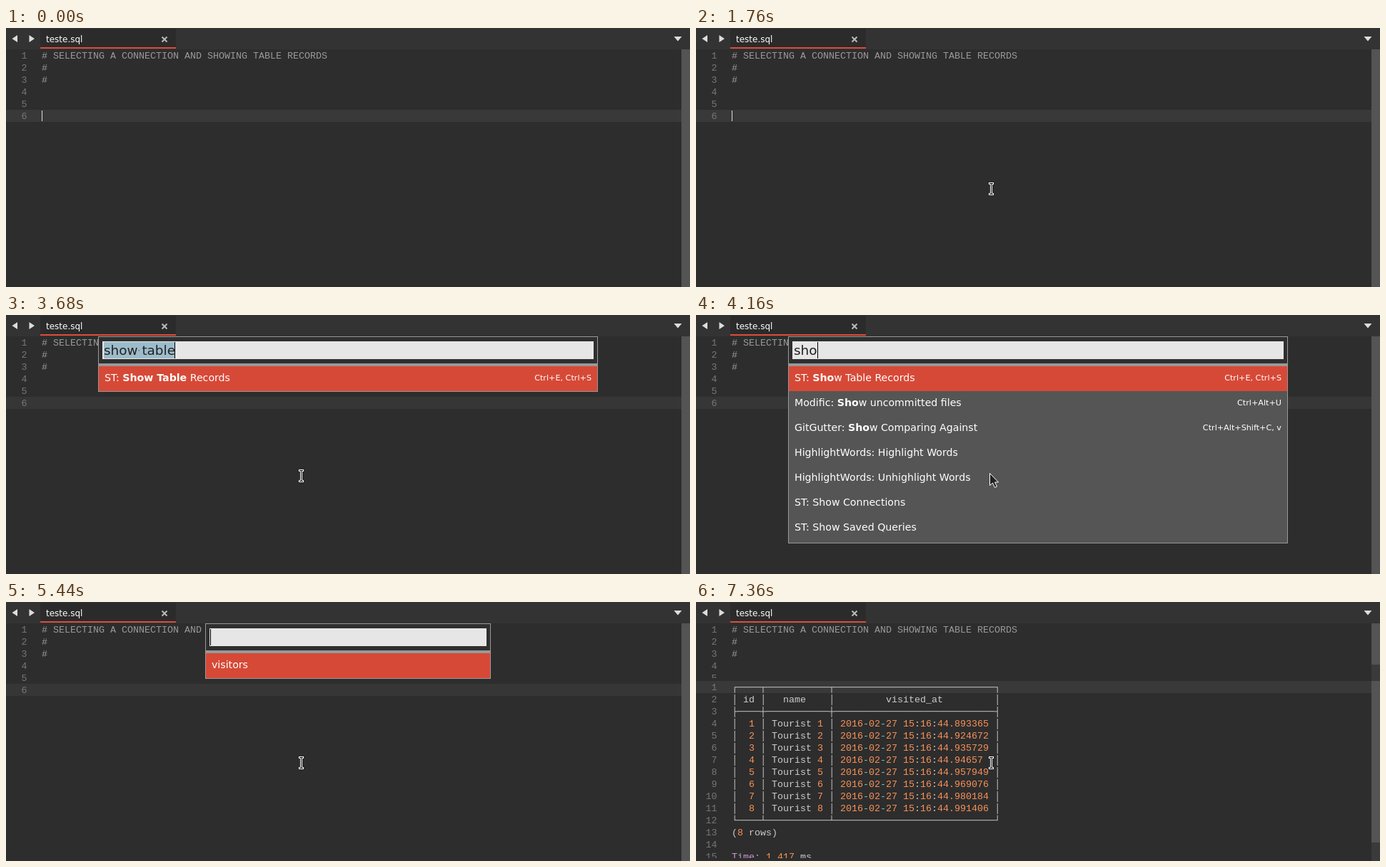
Write an HTML page that moves like this. It is 958 by 364 pixels and loops after 8000 ms.

```html
<!DOCTYPE html>
<html lang="en">
<head>
<meta charset="utf-8">
<title>SQL editor</title>
<style>
  html, body { margin: 0; width: 100%; height: 100%; overflow: hidden; background: #2d2d2d; }
  svg { display: block; }
  text { white-space: pre; font-family: "DejaVu Sans", sans-serif; }
  .code { font: 13.333px "Liberation Mono", monospace; }
</style>
</head>
<body>
<svg id="stage" width="958" height="364" viewBox="0 0 958 364"></svg>
<script>
const LOOP = 8000;
const RED = '#d64937', FG = '#ccc', DIM = '#777';

const rect = (x, y, w, h, fill) =>
  `<rect x="${x}" y="${y}" width="${w}" height="${h}" fill="${fill}"/>`;
const text = (x, y, s, size, fill = '#fff', anchor = 'start') =>
  `<text x="${x}" y="${y}" font-size="${size}" fill="${fill}" text-anchor="${anchor}">${s}</text>`;
const code = (x, y, s, fill, anchor = 'start') =>
  `<text class="code" x="${x}" y="${y}" fill="${fill}" text-anchor="${anchor}">${s}</text>`;
const path = (d, attrs) => `<path d="${d}" ${attrs}/>`;
const tint = (s, fill) => `<tspan fill="${fill}">${s}</tspan>`;
const bold = s => s.replace(/\*(.+?)\*/g, '<tspan font-weight="bold">$1</tspan>');

// Value of the last [start, value] step reached at time t
const at = (t, steps) => steps.reduce((v, [start, next]) => t >= start ? next : v, null);

const topBar =
  rect(0, 0, 958, 30, '#333') + rect(48, 1, 190, 28, '#2b2b2b') + rect(48, 27, 190, 2, '#dd4b39') +
  path('M16 10V20L8.5 15ZM32.5 10V20L40 15ZM935.5 12H946.5L941 18.5Z', 'fill="#ddd"') +
  path('M218.5 12.5L225.5 19.5M225.5 12.5L218.5 19.5', 'stroke="#bbb" stroke-width="2"') +
  text(56, 20, 'teste.sql', 12);

function editor(focused) {
  let s = rect(0, 115, 946, 17, focused ? '#393939' : '#363636') + rect(946, 30, 12, 334, '#545454');
  for (let n = 1; n <= 6; n++) s += code(29.5, 26 + 17 * n, n, DIM, 'end');
  ['# SELECTING A CONNECTION AND SHOWING TABLE RECORDS', '#', '#']
    .forEach((line, i) => s += code(50, 43 + 17 * i, line, '#999'));
  return s;
}

// Framed list with an input line; each row is "label|right side" or "label|right|detail"
function popup(x, w, bottom, input, caretX, rows, selected, pitch, marked) {
  let s = rect(x, 30, w, bottom - 30, '#999') + rect(x + 1, 31, w - 2, 37, '#2f2f2f') +
    rect(x + 6, 37, w - 12, 25, '#e6e6e6') + rect(x + 1, 72, w - 2, bottom - 73, '#555');
  if (marked) s += rect(x + 8, 38, 100, 23, '#9dbccb') + rect(x + 56.5, 49, 1.5, 1.5, '#667');
  s += text(x + 8, 56, input, 18.4, '#222');
  if (caretX) s += rect(caretX, 38, 1, 23, '#000');
  rows.forEach((row, i) => {
    const [label, right = '', detail = ''] = row.split('|'), y = 72 + pitch * i;
    if (i === selected) s += rect(x + 1, y, w - 2, pitch, RED);
    s += text(x + 9, y + 21, bold(label), 14.15) +
      text(x + w - 9, y + 20, right, 11.2, '#fff', 'end') + text(x + 13, y + 42, detail, 11.2);
  });
  return s;
}

const connections = ['lmonteiro', 'lmontero', 'lmontero'].map((user, i) =>
  `Connection ${i + 1}||DB: connection, Connection: ${user}@localhost:5432`);

const showRows = [
  'Modific: *Show* uncommitted files|Ctrl+Alt+U',
  'ST: *Show* Table Records|Ctrl+E, Ctrl+S',
  'GitGutter: *Show* Comparing Against|Ctrl+Alt+Shift+C, v',
  'HighlightWords: Highlight Words',
  'HighlightWords: Unhighlight Words'
];
const sRows = [
  '*S*T: Show Table Records|Ctrl+E, Ctrl+S',
  '*S*T: Select Connection|',
  '*S*T: Describe Table|',
  'Modific: *S*how uncommitted files|Ctrl+Alt+U',
  'GitGutter: *S*how Comparing Against|Ctrl+Alt+Shift+C, v',
  'HighlightWords: Highlight Word*s*',
  'HighlightWords: Unhighlight Word*s*'
];
const shoRows = [
  'ST: *Sho*w Table Records|Ctrl+E, Ctrl+S',
  'Modific: *Sho*w uncommitted files|Ctrl+Alt+U',
  'GitGutter: *Sho*w Comparing Against|Ctrl+Alt+Shift+C, v',
  'HighlightWords: Highlight Words',
  'HighlightWords: Unhighlight Words',
  'ST: Show Connections',
  'ST: Show Saved Queries'
];

const palette = (input, caretX, rows, selected = 0, bottom = 108, marked = false) =>
  popup(129, 700, bottom, input, caretX, rows, selected, 35, marked);
const found = label => [`ST: ${label} Records|Ctrl+E, Ctrl+S`];
const tables = caret => popup(279, 400, 108, '', caret && 286, ['visitors'], 0, 35);

const popups = [
  [0, ''],
  [1280, popup(279, 400, 250, '', 286, connections, 0, 59)],
  [1760, ''],
  [3680, palette('show table', 236, found('*Show Table*'), 0, 108, true)],
  [4000, palette('s', 147, sRows, 0, 321)],
  [4160, palette('sho', 170, shoRows, 0, 321)],
  [4320, palette('show', 184, showRows, 1, 248)],
  [4640, palette('show ', 190, showRows, 1, 248)],
  [4800, palette('show tab', 220, found('*Show Tab*le'))],
  [5120, palette('show table', 236, found('*Show Table*'))],
  [5440, tables(true)],
  [6240, tables(false)],
  [6720, tables(true)],
  [7200, '']
];

function results() {
  const rule = ends => ends[0] + [4, 11, 28].map(n => '─'.repeat(n)).join(ends[1]) + ends[2];
  const micros = ['893365', '924672', '935729', '94657 ', '957949', '969076', '980184', '991406'];
  const paint = s => s.replace(/[\d.]+|-/g, m => tint(m, m === '-' ? '#6cc' : '#f99157'));
  const lines = [
    rule('┌┬┐'),
    '│ id │   name    │         visited_at         │',
    rule('├┼┤'),
    ...micros.map((m, i) => `│  ${i + 1} │ Tourist ${i + 1} │ 2016-02-27 15:16:44.${m} │`),
    rule('└┴┘'),
    '(8 rows)',
    '',
    'Time: 1.417 ms'
  ];
  let s = rect(0, 107, 958, 257, '#2d2d2d') + rect(0, 111, 946, 17, '#393939') +
    rect(946, 88, 12, 276, '#3a3a3a') + rect(946, 111, 12, 227, '#545454');
  lines.forEach((line, i) => {
    const y = 124 + 17 * i;
    s += code(29.5, y, i + 1, DIM, 'end') +
      code(50, y, paint(line).replace('Time:', tint('Time:', '#c9c')), FG);
  });
  return s + rect(0, 360, 946, 4, '#2d2d2d');
}
const panel = results();

const beamPath = 'M-2 -7.5H2M0 -7.5V7.5M-2 7.5H2';
const beam = (x, y) => `<g transform="translate(${x} ${y})" stroke-linecap="square">` +
  path(beamPath, 'stroke="#fff" stroke-width="3"') +
  path(beamPath, 'stroke="#111" stroke-width="1"') + '</g>';
const arrow = path('M411.5 222.5v17l4 -3.5l3 6.5l3 -1.5l-3 -6h5Z', 'fill="#222" stroke="#fff"');
const restBeam = beam(413.5, 226);
const pointers = [
  [0, ''], [160, beam(420.5, 235.5)], [320, restBeam], [1280, arrow],
  [1760, restBeam], [4000, arrow], [4640, restBeam]
];
const carets = [
  [0, true], [1120, false], [1760, true], [2560, false],
  [3040, true], [3680, false], [7200, true], [7360, false]
];

const stage = document.getElementById('stage');
let shown = '';
function draw(now) {
  const t = now % LOOP, open = at(t, popups);
  const picture = rect(0, 0, 958, 364, '#2d2d2d') + topBar + editor(!open) +
    (at(t, carets) ? rect(50, 116, 1, 15, '#ddd') : '') +
    (t >= 7360 ? panel : '') + open + at(t, pointers);
  if (picture !== shown) stage.innerHTML = shown = picture;
  requestAnimationFrame(draw);
}
draw(performance.now());
</script>
</body>
</html>
```
